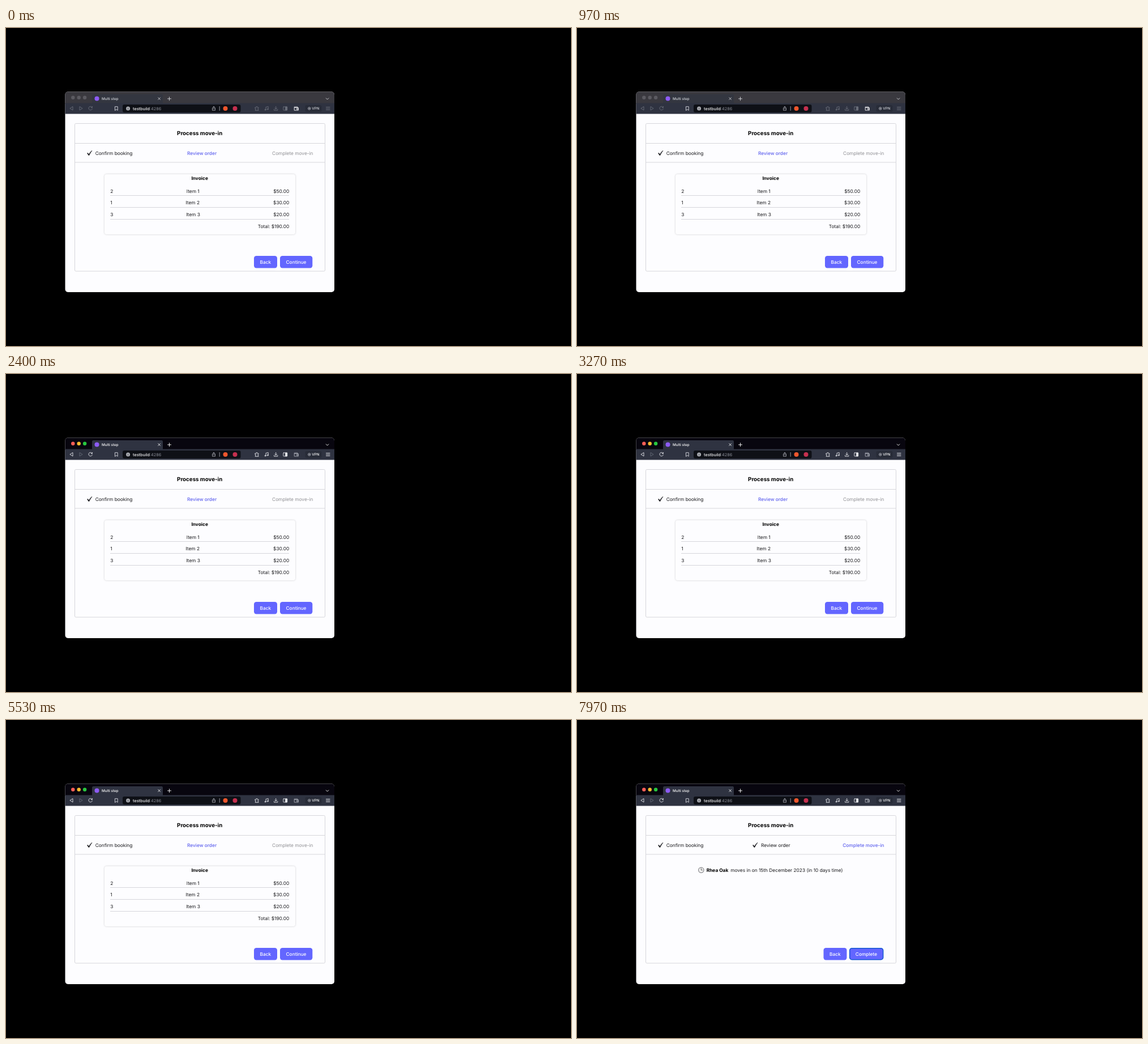
An HTML page that plays this animation: 998x561 px, repeating every 8 s.

```html
<!DOCTYPE html>
<html lang="en">
<head>
<meta charset="utf-8">
<title>Multi step</title>
<style>
  html, body { margin: 0; width: 100%; height: 100%; overflow: hidden; background: #000; }
  svg { display: block; width: 100%; height: 100%; --strip: #3a393f; --tab: #333640; --icon: #6a6e79; --bright: #d5d7dc; --wallet: #f2f2f4; }
  svg.focused { --strip: #08060f; --tab: #2f3341; --icon: #e4e5e9; --bright: #fff; --wallet: #a9acb5; }
  text { font: 8.33px Inter, sans-serif; fill: #18181b; text-rendering: geometricPrecision; white-space: pre; }
  .bold { font-weight: 700; fill: #000; }
  .title { font-size: 9.75px; }
  .current { font-weight: 500; fill: #5f62ee; }
  .pending { fill: #909094; }
  .end { text-anchor: end; }
  .mid { text-anchor: middle; }
  .button text { font-weight: 500; fill: #fff; text-anchor: middle; }
  .button rect { fill: #6366ff; }
  .chrome text { font-size: 6.3px; font-weight: 500; fill: var(--bright); }
  .chrome .address { font-size: 7.25px; fill: #f4f4f6; }
  .chrome .port { font-weight: 400; fill: #8f929b; }
  .icons { fill: none; stroke: var(--icon); stroke-width: .9; stroke-linejoin: round; stroke-linecap: round; }
  .rule { fill: none; stroke: #d6d6db; stroke-width: 1; }
  .card { fill: #fdfdff; filter: drop-shadow(0 0 1.5px #0003); }
  .hidden { display: none; }
</style>
</head>
<body>
<svg id="stage" viewBox="0 0 998 561">
  <defs>
    <clipPath id="frame"><rect x="104.5" y="112.5" width="475.5" height="353.5" rx="5"/></clipPath>
    <path id="tick" fill="#222226" d="M0 4.8Q1.5 3.7 2.4 4.9L3.3 6.6Q5.6 2.5 8.7 0L9.3.5Q6 4.3 4.1 8.8Q3 9.5 2.3 8.3Z"/>
  </defs>

  <g clip-path="url(#frame)">
    <rect x="104" y="112" width="477" height="355" fill="#fdfdff"/>
    <g class="chrome">
      <rect x="104" y="112" width="477" height="22" fill="var(--strip)"/>
      <path d="M152 133V119.500Q152 117 154.500 117H274.500Q277 117 277 119.500V133Z" fill="var(--tab)"/>
      <rect x="104" y="132.500" width="477" height="19" fill="#2f3341"/>
      <rect x="206" y="135" width="208.500" height="14" rx="3" fill="#0e1016"/>
      <g id="lights"></g>

      <circle cx="160.500" cy="124.500" r="4" fill="#8d5bf5"/>
      <text x="169" y="126.800">Multi step</text>
      <g class="icons" style="stroke: var(--bright)">
        <path d="M268.800 122.800l3.600 3.600m0-3.600l-3.600 3.600M285.500 124.800h6m-3-3v6M565.300 123.800l2.300 2.300l2.300-2.300"/>
      </g>

      <g class="icons">
        <path d="M118 139v6l-4.800-3z"/>
        <path d="M130 139v6l4.800-3z" stroke="#656a76"/>
        <path d="M152 139.700a3.300 3.300 0 1 0 .4 3M152.400 138.400v2.100h-2.200"/>
        <path d="M192.800 138.700h4.400v6.600l-2.200-1.800l-2.200 1.800z" stroke="#d8dae0"/>
        <path d="M365.500 141h-1v4.200h5V141h-1M367 143v-4.500m-1.500 1.300l1.500-1.400l1.500 1.400" stroke="#a6a8af"/>
        <path d="M377.200 138.500v7" stroke="#a6a8af"/>
        <path d="M440.300 140h1.800q-.2-1.500.9-1.500t.9 1.500h2v2q-1.300-.1-1.300.9t1.300.9v1.700h-5.600v-1.600q1.300 0 1.300-1t-1.300-.9z"/>
        <path d="M459 144.200v-4.700l4.200-.9v4.700"/>
        <circle cx="458" cy="144.200" r="1"/><circle cx="462.200" cy="143.300" r="1"/>
        <path d="M476.700 138.400v4.700m-2-1.900l2 1.900l2-1.900M473.600 143.500v1.700h6.200v-1.700"/>
        <rect x="489.800" y="139" width="6.800" height="6" rx=".6"/>
        <rect x="493.800" y="139" width="2.800" height="6" fill="var(--icon)"/>
        <g stroke="var(--wallet)">
          <path d="M509.600 139.200h5.400v1.300h1.300v4.700h-6.700zM509.600 140.500h5.400"/>
          <path d="M513.700 142h2.600v1.700h-2.600z"/>
        </g>
        <path d="M565.500 139.600h6.500m-6.500 2.400h6.500m-6.500 2.400h6.500"/>
      </g>
      <rect x="528.500" y="136" width="29" height="12" rx="3" fill="#282c38"/>
      <circle cx="535.800" cy="142" r="2.300" fill="none" stroke="#bfc1c8" stroke-width=".8"/>
      <circle cx="535.800" cy="142" r="1" fill="#bfc1c8"/>
      <text x="540.300" y="144.300">VPN</text>
      <circle cx="215.600" cy="142" r="3.500" fill="#a9abb1"/>
      <path d="M215.600 141.500v2.200m0-3.500v.4" stroke="#30323a" stroke-width=".9"/>
      <text class="address" x="224" y="144.600">testbuild<tspan class="port">:4286</tspan></text>
      <circle cx="387.500" cy="142" r="4" fill="#f0562d"/>
      <circle cx="404.500" cy="142" r="4" fill="#c5304f"/>
    </g>

    <rect class="rule" x="121.500" y="168.500" width="442" height="260.500" rx="2"/>
    <path class="rule" d="M121.500 203.500h442M121.500 237h442"/>
    <text class="bold title mid" x="342.200" y="189">Process move-in</text>
    <use href="#tick" x="143" y="216"/>
    <text x="157.700" y="223.500">Confirm booking</text>

    <g id="review">
      <text class="current" x="320" y="223.500">Review order</text>
      <text class="pending end" x="542.500" y="223.500">Complete move-in</text>
      <rect class="card" x="174" y="258" width="337" height="106" rx="4"/>
      <text class="bold mid" x="342.200" y="268">Invoice</text>
      <g id="invoice"></g>
      <text class="end" x="500.300" y="353">Total: $190.00</text>
      <g class="button"><rect x="438" y="402" width="41" height="21.500" rx="4.200"/><text x="458.400" y="415.600">Back</text></g>
      <g class="button"><rect x="484" y="402" width="57.300" height="21.500" rx="4.200"/><text x="512.500" y="415.600">Continue</text></g>
    </g>

    <g id="complete" class="hidden">
      <use href="#tick" x="310" y="216"/>
      <text x="325" y="223.500">Review order</text>
      <text class="current end" x="542.500" y="223.500">Complete move-in</text>
      <circle cx="219.300" cy="264.800" r="4.700" fill="#f4f4f4" stroke="#88888c" stroke-width="1.200"/>
      <circle cx="219.300" cy="264.800" r="3.500" fill="none" stroke="#aaa" stroke-width=".7" stroke-dasharray=".5 1.333"/>
      <path d="M219.300 261.600v3.200h2.500" fill="none" stroke="#444" stroke-width=".8"/>
      <text class="bold" x="228.700" y="267.800">Rhea Oak</text>
      <text x="271.200" y="267.800">moves in on 15th December 2023 (in 10 days time)</text>
      <g class="button"><rect x="435.500" y="402" width="41" height="21.500" rx="4.200"/><text x="455.800" y="415.600">Back</text></g>
      <g class="button"><rect x="481.700" y="402.700" width="59" height="20" rx="3.800" stroke="#1457d2" stroke-width="1.500"/><text x="511" y="415.600">Complete</text></g>
    </g>
  </g>
</svg>
<script>
  const LOOP = 8000, FOCUS_AT = 2060, COMPLETE_AT = 6270;
  const byId = id => document.getElementById(id);
  const stage = byId("stage"), review = byId("review"), complete = byId("complete");

  byId("lights").innerHTML = ["#ff5f57", "#febc2e", "#28c840"].map((color, i) =>
    `<circle cx="${118.3 + i * 10.4}" cy="122.800" r="3.200" data-color="${color}"/>`).join("");
  const lights = [...byId("lights").children];

  const items = [[2, 318.8, "$50.00"], [1, 317.5, "$30.00"], [3, 318.2, "$20.00"]];
  byId("invoice").innerHTML = items.map(([count, x, price], i) => {
    const y = 290.5 + i * 20.8;
    return `<text x="184.300" y="${y}">${count}</text>
      <text x="${x}" y="${y}">Item ${i + 1}</text>
      <text class="end" x="500.300" y="${y}">${price}</text>
      <path class="rule" d="M184 ${Math.floor(y + 6) - 0.5}h316"/>`;
  }).join("");

  function draw(now) {
    const time = now % LOOP;
    const focused = time >= FOCUS_AT, done = time >= COMPLETE_AT;
    stage.classList.toggle("focused", focused);
    lights.forEach(light => light.setAttribute("fill", focused ? light.dataset.color : "#5b5a61"));
    review.classList.toggle("hidden", done);
    complete.classList.toggle("hidden", !done);
    requestAnimationFrame(draw);
  }
  draw(performance.now());
</script>
</body>
</html>
```
